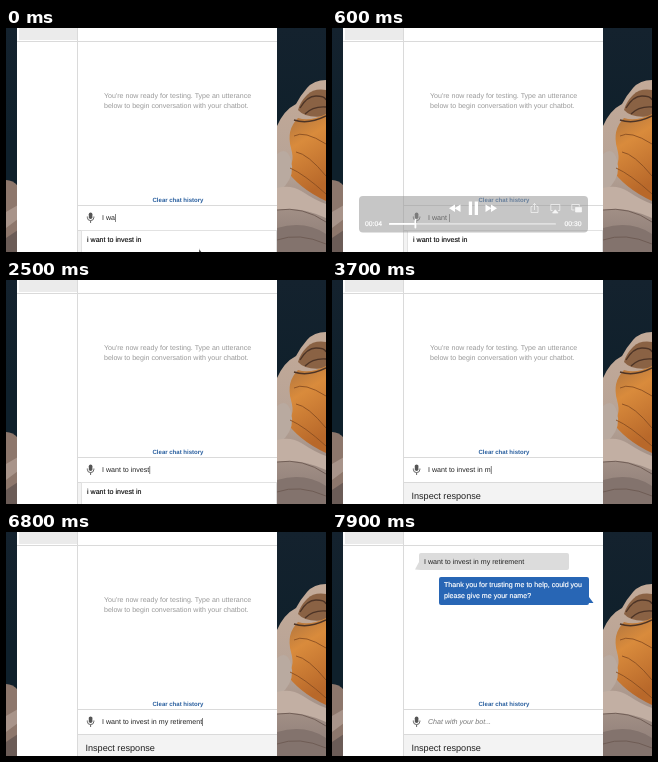
An HTML page for the animation above (8 s loop, 320 by 224 pixels).

```html
<!DOCTYPE html>
<html lang="en">
<head>
<meta charset="utf-8">
<title>Chatbot test</title>
<style>
  html, body { margin: 0; width: 100%; height: 100%; overflow: hidden; background: #fff; }
  svg { display: block; width: 320px; height: 224px; }
  text {
    font: 7.1px "Liberation Sans", Arial, sans-serif;
    fill: #222;
    white-space: pre;
    text-rendering: geometricPrecision;
  }
  .line { stroke: #dadada; fill: none; }
  .intro text { font-size: 7.06px; fill: #999; }
  .link { font-size: 6.04px; font-weight: bold; fill: #285e9e; }
  .heading { font-size: 9.13px; }
  .hint { font-style: italic; fill: #777; }
  .reply text { fill: #fff; stroke: #fff; stroke-width: .18px; }
  .option { fill: #000; stroke: #000; stroke-width: .12px; }
  .time { font-size: 6.8px; fill: #fff; stroke: #fff; stroke-width: .2px; }
</style>
</head>
<body>
<svg viewBox="0 0 320 224">
  <defs>
    <linearGradient id="sky" x2="0" y2="1">
      <stop stop-color="#14222e"/><stop offset=".5" stop-color="#0f202b"/>
    </linearGradient>
    <linearGradient id="rock" x2="0" y2="1">
      <stop stop-color="#c3aa98"/><stop offset=".5" stop-color="#b7a396"/>
      <stop offset="1" stop-color="#8b7b75"/>
    </linearGradient>
    <linearGradient id="glow" x2=".3" y2="1">
      <stop stop-color="#a9713f"/><stop offset=".4" stop-color="#d98b3c"/>
      <stop offset="1" stop-color="#b8682a"/>
    </linearGradient>
  </defs>

  <!-- desktop -->
  <rect width="320" height="224" fill="url(#sky)"/>
  <path d="M0 152q7 0 12 6v66H0z" fill="#8d776c"/>
  <path d="M0 184l12-7v14L0 200z" fill="#a8948a"/>
  <path d="M0 210l12-8v22H0z" fill="#6b5c57"/>
  <path d="M320 52Q308 52 301 60T290 76Q278 82 271 98V224H320z" fill="url(#rock)"/>
  <path d="M320 62Q308 60 301 67T292 82Q300 91 320 88z" fill="#8a6244"/>
  <path d="M320 86Q304 94 292 90Q280 102 285 120T279 140Q292 160 320 173z" fill="url(#glow)"/>
  <path d="M271 126q10-8 14 6t-6 26q-4 4-8 2z" fill="#b9aaa0"/>
  <path d="M271 160q14-4 26 4t23 12v14q-26-12-49-8z" fill="#c2afa3"/>
  <path d="M271 200q28-8 49 6v18h-49z" fill="#83736d"/>
  <g fill="none" stroke="#4d3426">
    <path d="M294 80q7-12 16-12t10 4M299 86q8-8 21-7M288 92q14 5 32-4" stroke-width="1.4"/>
    <path d="M288 108q10-6 32 8M290 124q12 2 30 24M284 140q14 6 36 26" stroke="#8a4e22" stroke-width=".9"/>
    <path d="M271 182q26-4 49 12M271 212q22-8 49 4" stroke="#6c5a52" stroke-width=".9"/>
  </g>

  <!-- window -->
  <rect x="11" width="260" height="224" fill="#fff"/>
  <rect x="13" width="58" height="12" fill="#ebebeb"/>
  <path class="line" d="M11 13.5H271M71.5 0V224M72 177.5H271"/>
  <g class="intro" id="intro">
    <text x="98" y="70">You're now ready for testing. Type an utterance</text>
    <text x="98" y="80.3">below to begin conversation with your chatbot.</text>
  </g>
  <g id="sent">
    <path d="M83 37.5l4-7.5V23q0-2 2-2H235q2 0 2 2V36q0 2-2 2H89z" fill="#dcdcdc"/>
    <text x="92" y="32.3">I want to invest in my retirement</text>
  </g>
  <g class="reply" id="reply">
    <path d="M109 45H255q2 0 2 2V65l4.5 6H257q0 2-2 2H109q-2 0-2-2V47q0-2 2-2z" fill="#2866b5"/>
    <text x="112" y="55">Thank you for trusting me to help, could you</text>
    <text x="112" y="65.8">please give me your name?</text>
  </g>
  <text class="link" x="146.5" y="173.6">Clear chat history</text>

  <!-- input row -->
  <rect x="82.8" y="184.5" width="3.6" height="6.5" rx="1.8" fill="#555"/>
  <path d="M81.3 188.5v.8a3.3 3.3 0 0 0 6.6 0v-.8M84.6 192.6v2.4" fill="none" stroke="#555" stroke-width=".9"/>
  <text id="input" x="96" y="192.4"></text>
  <rect id="caret" y="186" width=".6" height="8" fill="#333"/>
  <text class="hint" id="hint" x="96" y="192.4">Chat with your bot...</text>

  <!-- lower panel -->
  <rect x="72" y="202" width="199" height="22" fill="#f3f3f3"/>
  <path class="line" d="M72 202.5H271"/>
  <text class="heading" x="79.4" y="219.2">Inspect response</text>
  <g id="options">
    <rect x="75.5" y="202.5" width="195" height="30" fill="#fff" stroke="#e2e2e2"/>
    <text class="option" x="81" y="214.2">i want to invest in</text>
  </g>

  <!-- player controls -->
  <g id="player">
    <rect x="27" y="168" width="229" height="36.5" rx="4" fill="#999" fill-opacity=".56"/>
    <g fill="#fff">
      <path d="M123 176.5v7.5l-6-3.75zM128.5 176.5v7.5l-6-3.75z"/>
      <path d="M153.5 176.5v7.5l6-3.75zM159 176.5v7.5l6-3.75z"/>
      <rect x="136.8" y="173.5" width="3.3" height="13.5"/>
      <rect x="142.7" y="173.5" width="3.3" height="13.5"/>
    </g>
    <g fill="none" stroke="#fff" stroke-width=".7" opacity=".85">
      <path d="M200.5 178.5H199v6h7v-6h-1.5M202.5 182v-6.5M200.7 177.3l1.8-1.8 1.8 1.8"/>
      <path d="M220.5 182.5h-1.7v-6h9v6h-1.7M242.5 182h-2.7v-5.5h7.5v2"/>
      <path d="M220.5 185l2.8-3.2 2.8 3.2zM243.5 179.5h6v4.5h-6z" fill="#fff"/>
    </g>
    <rect x="57" y="195" width="167" height="1.8" rx=".9" fill="#fff" fill-opacity=".45"/>
    <rect x="57" y="195" width="26" height="1.8" rx=".9" fill="#fff"/>
    <rect x="82.5" y="191" width="1.8" height="9.5" rx=".9" fill="#fff"/>
    <text class="time" x="33" y="198.3">00:04</text>
    <text class="time" x="232.5" y="198.3">00:30</text>
  </g>
  <path id="pointer" d="M193 220.5v9l2-2 3 .5z" fill="#111" stroke="#fff" stroke-width=".6"/>
</svg>
<script>
  const LOOP = 8000, SEND = 7000, REPLY = 7400, CLOSE = 3600;
  const message = 'I want to invest in my retirement';
  const typed = 4; // characters present at the start
  const keys = [
    200, 400, 500, 700, 800, 1000, 1100, 1500, 1900, 2100,
    2300, 2500, 2700, 3000, 3200, 3400, 3600, 3800, 4000, 4400,
    4700, 4900, 5100, 5300, 5600, 5800, 6000, 6300, 6500
  ];
  const $ = id => document.getElementById(id);
  const input = $('input'), caret = $('caret'), player = $('player');
  const show = (id, on) => { $(id).style.display = on ? '' : 'none'; };
  const ramp = (t, from, to) => Math.min(1, Math.max(0, (t - from) / (to - from)));
  let shown = -1;

  function type(count) {
    if (count === shown) return;
    shown = count;
    input.textContent = message.slice(0, count).replace(/ /g, '\u00a0');
    caret.setAttribute('x', 96.2 + input.getComputedTextLength());
  }

  function draw(t) {
    const sent = t >= SEND;
    show('input', !sent);
    show('caret', !sent);
    show('intro', !sent);
    show('sent', sent);
    show('hint', sent);
    show('reply', t >= REPLY);
    show('options', t < CLOSE);
    show('pointer', t < 100);
    if (!sent) type(typed + keys.filter(k => k <= t).length);
    player.style.opacity = ramp(t, 100, 300) * (1 - ramp(t, 900, 1100));
  }

  const start = performance.now();
  function tick() {
    draw((performance.now() - start) % LOOP);
    requestAnimationFrame(tick);
  }
  tick();
</script>
</body>
</html>
```
